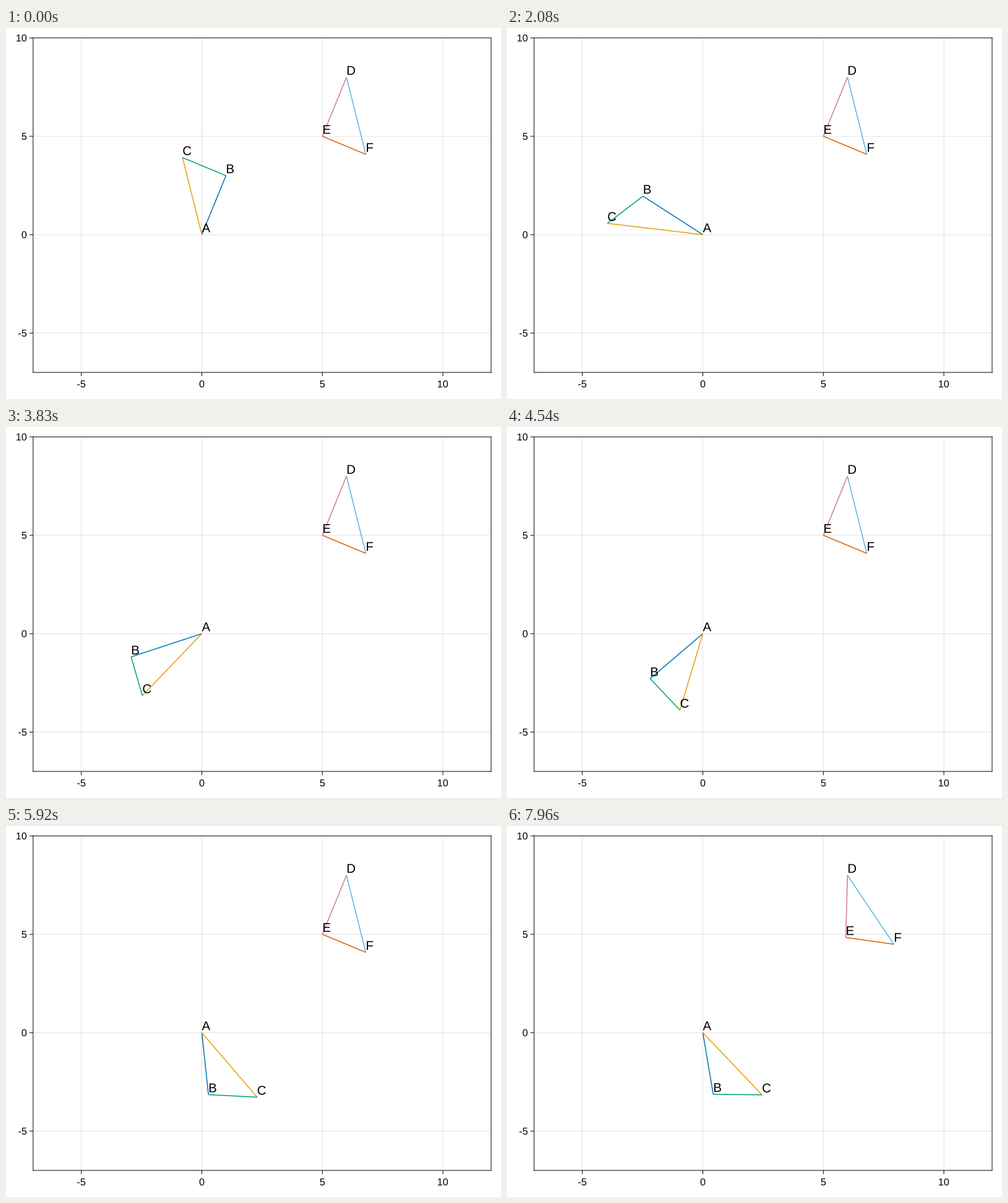
Recreate the animation shown at these times as a matplotlib script. Size 800 by 600 pixels, loop 8000 ms.

```python
import numpy as np
import matplotlib.pyplot as plt
from matplotlib.animation import FuncAnimation
from matplotlib.patches import PathPatch
from matplotlib.textpath import TextPath
from matplotlib.transforms import Affine2D

W, H, DPI = 800, 600, 100
PT = 72 / DPI
FRAMES, LOOP = 192, 8000
LEFT, RIGHT, BOTTOM, TOP = 43.8, 784, 43, 584
FONT = {"family": "Liberation Sans"}

# First turn, short rest, second turn (radians, frames)
TURN_1, END_1 = 3.6, 144
TURN_2, START_2, END_2 = 0.3, 146, 186

fig = plt.figure(figsize=(W / DPI, H / DPI), dpi=DPI, facecolor="white")
ax = fig.add_axes([0, 0, 1, 1])
ax.set_xlim(0, W)
ax.set_ylim(0, H)
ax.axis("off")


def px(x):
    return LEFT + (x + 7) * (RIGHT - LEFT) / 19


def py(y):
    return BOTTOM + (y + 7) * (TOP - BOTTOM) / 17


def stroke(xs, ys, color="black", width=1, **kw):
    line, = ax.plot(xs, ys, color=color, lw=width * PT, snap=False,
                    solid_capstyle="butt", **kw)
    return line


def glyphs(text, size):
    path = TextPath((0, 0), text, size=size, prop=FONT)
    patch = PathPatch(path, facecolor="black", lw=0, zorder=5, snap=False)
    ax.add_artist(patch)
    return patch, path.get_extents()


def move(patch, x, y):
    patch.set_transform(Affine2D().translate(x, y) + ax.transData)


def draw_axes():
    for v in (-5, 0, 5, 10):
        x, y = px(v), py(v)
        stroke([x, x], [BOTTOM, TOP], alpha=0.12)
        stroke([x, x], [BOTTOM - 6, BOTTOM])
        label, box = glyphs(str(v), 16.2)
        move(label, x - (box.x0 + box.x1) / 2, 18.8)

        if v < 10:
            stroke([LEFT, RIGHT], [y, y], alpha=0.12)
        stroke([LEFT - 6, LEFT], [y, y])
        label, box = glyphs(str(v), 16.2)
        move(label, 33.2 - box.x1, y - 5.7)

    for x in (LEFT, RIGHT):
        stroke([x, x], [BOTTOM - 0.5, TOP + 0.5])
    for y in (BOTTOM, TOP):
        stroke([LEFT - 0.5, RIGHT + 0.5], [y, y])


def polar(r, angle):
    return r * np.array([np.cos(angle), np.sin(angle)])


def triangle(corner, turn):
    base = np.arctan2(3, 1) + turn
    corner = np.array(corner, float)
    return (corner, corner + polar(np.sqrt(10), base),
            corner + polar(4, base + np.pi / 6))


def progress(n, start, end):
    return min(max((n - start) / (end - start), 0), 1)


draw_axes()
EDGES = {"AB": "#0072B2", "AC": "#E69F00", "BC": "#009E73",
         "DE": "#CC79A7", "DF": "#56B4E9", "EF": "#D55E00"}
edges = {k: stroke([], [], c, 1.5, zorder=3) for k, c in EDGES.items()}
names = {k: glyphs(k, 20.5)[0] for k in "ABCDEF"}


def update(n):
    first = triangle((0, 0), TURN_1 * progress(n, 0, END_1))
    second = triangle((6, 8), np.pi + TURN_2 * progress(n, START_2, END_2))
    points = {k: (px(x), py(y)) for k, (x, y) in zip("ABCDEF", first + second)}
    for key, line in edges.items():
        line.set_data(*zip(points[key[0]], points[key[1]]))
    for key, patch in names.items():
        x, y = points[key]
        move(patch, x, y + 4)
    return [*edges.values(), *names.values()]


anim = FuncAnimation(fig, update, frames=FRAMES, interval=LOOP / FRAMES,
                     init_func=lambda: update(0), repeat=True, repeat_delay=0)
plt.show()
```
